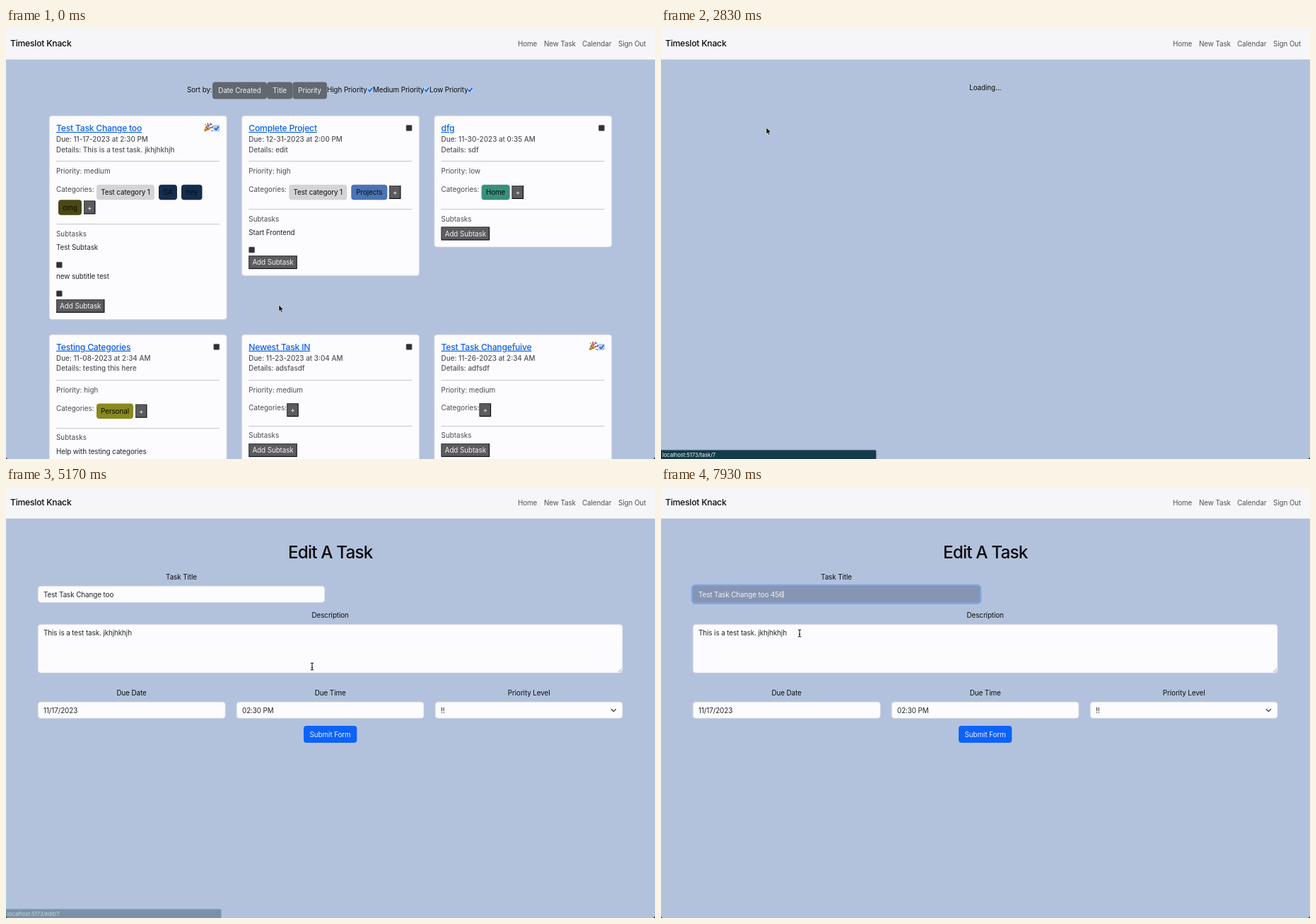
Recreate the animation shown at these times as an HTML page. Size 918 px wide and 610 px high, loop 8 s.

```html
<!DOCTYPE html>
<html lang="en">
<head>
<meta charset="utf-8">
<title>Task planner</title>
<style>
  html, body { margin: 0; width: 100%; height: 100%; overflow: hidden; background: #b3c2dc; }
  svg { display: block; width: 918px; height: 610px; }
  text { font: 400 9.9px Inter, "Open Sans", sans-serif; letter-spacing: -.01em; font-optical-sizing: none; fill: #212529; white-space: pre; }
  .mid { text-anchor: middle; }
  .nav { fill: #505357; }
  .soft { fill: #484b4f; letter-spacing: 0; }
  .sub { fill: #505357; font-weight: 500; letter-spacing: 0; }
  .black { fill: #0b0c0e; }
  .light { fill: #f1f1f4; }
  .head { font-size: 12.2px; font-weight: 500; letter-spacing: -.02em; }
  .link { fill: #0c64e4; text-decoration: underline; }
  .big { font-size: 24.3px; font-weight: 500; letter-spacing: -.035em; fill: #0b0c0e; }
  .option { font-size: 7.9px; font-weight: 500; fill: #f0f0f0; }
  .url { font-size: 7.7px; fill: #f4f7f8; }
  .card { fill: #fcfbfe; stroke: #d0d2d9; stroke-width: .6; }
  .field { fill: #fcfbfe; stroke: #d5dbe5; stroke-width: .6; }
  .check { fill: #303033; stroke: #6c6c70; stroke-width: .6; }

  #cursor { animation: travel 8s ease-in-out infinite; }
  @keyframes travel {
    0%, 4% { transform: translate(386px, 392px); }
    14.6% { transform: translate(474px, 349px); }
    20.5% { transform: translate(150px, 141px); }
    30.6%, 41.5% { transform: translate(149px, 141px); }
    49.6% { transform: translate(395px, 288px); }
    53% { transform: translate(432px, 254px); }
    64.8% { transform: translate(433px, 254px); }
    75%, 84% { transform: translate(164px, 154px); }
    87.5%, 93% { transform: translate(164px, 205px); }
    99%, 100% { transform: translate(196px, 207px); }
  }
  #taskUrl { opacity: 0; animation: taskUrl 8s linear infinite; }
  @keyframes taskUrl { 0%, 20.5% { opacity: 0; } 22%, 42% { opacity: 1; } 45%, 100% { opacity: 0; } }
  #editUrl { opacity: 0; animation: editUrl 8s linear infinite; }
  @keyframes editUrl { 0%, 53.2% { opacity: 0; } 55%, 61% { opacity: 1; } 64.6% { opacity: .36; } 67%, 100% { opacity: 0; } }
</style>
</head>
<body>
<script>
const LOOP = 8000;
const styles = [];

const text = (x, y, str, cls = '') => `<text x="${x}" y="${y}" class="${cls}">${str}</text>`;
const box = (x, y, w, h, fill, r = 0) => `<rect x="${x}" y="${y}" width="${w}" height="${h}" rx="${r}" fill="${fill}"/>`;
const path = (d, fill, stroke = 'none', width = 1) => `<path d="${d}" fill="${fill}" stroke="${stroke}" stroke-width="${width}"/>`;

// Rectangle whose border lies inside its bounds.
const panel = (x, y, w, h, cls, r = 4) =>
  `<rect x="${x + .3}" y="${y + .3}" width="${w - .6}" height="${h - .6}" rx="${r}" class="${cls}"/>`;

// A group that is visible only during the given [from, to] spans in ms.
function during(id, spans, content) {
  const stops = spans.map(([from, to]) =>
    `${from / LOOP * 100}%{visibility:visible}${to / LOOP * 100}%{visibility:hidden}`).join('');
  styles.push(`#${id}{visibility:hidden;animation:${id} ${LOOP}ms step-end infinite}@keyframes ${id}{0%{visibility:hidden}${stops}}`);
  return `<g id="${id}">${content}</g>`;
}

const button = (x, y, w, h, fill, label, cls = 'light') =>
  box(x, y, w, h, fill, 4) + text(x + w / 2, y + h / 2 + 3.6, label, 'mid ' + cls);

// Square button with an outset border.
const plainButton = (x, cy, w, label) =>
  box(x, cy - 9.5, w, 19, '#0c0c0e') + box(x, cy - 9.5, w - 1.3, 17.7, '#4a4a4d') +
  box(x + 1.3, cy - 8.2, w - 2.6, 16.4, '#5c5c5f') + text(x + w / 2, cy + 3.5, label, 'mid light');

const emptyCheck = (cx, cy) => panel(cx - 4.3, cy - 4.3, 8.6, 8.6, 'check', 1);
const tick = (cx, cy, size = 7.4) =>
  box(cx - size / 2, cy - size / 2, size, size, '#a9cdf8', 1.5) +
  path(`M${cx - 2.6} ${cy}l2 2.4 3.6-5`, 'none', '#155cc0', 1.5);

const popper = (x, y) =>
  path(`M${x} ${y + 12.5}l4-10 6 6.4z`, '#dca044') +
  path(`M${x + 1.4} ${y + 8.8}l2.4 2.4M${x + 2.8} ${y + 5.4}l4 4.4`, 'none', '#7d5a56', 1.3) +
  path(`M${x + 5} ${y + 4.6}q2-2 .6-4.8M${x + 8.4} ${y + 7.4}q2-1.8 4.8-.4`, 'none', '#b8453a', 1.4) +
  path(`M${x + 6.8} ${y + 5.8}q.6-4 5.4-4`, 'none', '#4a72b4', 1.4) +
  [[1.6, 1.2], [8.6, .2], [12, 4], [11, 10]].map(([dx, dy], i) =>
    box(x + dx, y + dy, 1.8, 1.8, ['#c99a2f', '#5a9150', '#b8453a', '#4a72b4'][i], .4)).join('');

function taskCard(x, y, task) {
  const { title, due, details, priority, done, cats = [], plus, rows = 1, subtasks = [] } = task;
  const left = x + 10;
  const rule = cy => box(left, Math.round(cy - .5), 231, 1, '#c6c6ca');
  const split = y + (cats.length ? 111.2 + 21.3 * rows : 129.4);
  const end = split + 34.5 + 40.6 * subtasks.length;
  const plusY = y + (cats.length ? 87 + 21.5 * rows : 107);
  return panel(x, y, 251.5, end + 19.3 - y, 'card') +
    text(left, y + 22, title, 'head link') +
    (done ? popper(x + 218.6, y + 10.4) + tick(x + 236.8, y + 17.8, 9) : emptyCheck(x + 236.8, y + 17.6)) +
    text(left, y + 37, 'Due: ' + due, 'sub') +
    text(left, y + 51.7, 'Details: ' + details, 'sub') +
    rule(y + 64.5) +
    text(left, y + 82, 'Priority: ' + priority, 'soft') +
    text(left, y + (cats.length ? 108 : 106.8), 'Categories:', 'soft') +
    cats.map(([label, dx, w, fill, row = 0]) =>
      button(x + dx, y + 97.8 + row * 21.5, w, 21.4, fill, label, 'black')).join('') +
    plainButton(x + plus, plusY, 16.5, '+') +
    rule(split) +
    text(left, split + 17, 'Subtasks', 'soft') +
    subtasks.map((name, i) => text(left, split + 36.3 + 40.6 * i, name) +
      emptyCheck(left + 4.3, split + 57.5 + 40.6 * i)).join('') +
    plainButton(left, end, 68.5, 'Add Subtask');
}

const general = ['Test category 1', 67, 82, '#d4d4d7'];
const columns = [61, 333.3, 605.6];
const tasks = [
  { title: 'Test Task Change too', due: '11-17-2023 at 2:30 PM', details: 'This is a test task. jkhjhkhjh', priority: 'medium', done: true,
    cats: [general, ['SA', 155, 26, '#132d4f'], ['hey', 187, 29.5, '#132d4f'], ['omg', 13, 33, '#4a4713', 1]],
    plus: 49, rows: 2, subtasks: ['Test Subtask', 'new subtitle test'] },
  { title: 'Complete Project', due: '12-31-2023 at 2:00 PM', details: 'edit', priority: 'high',
    cats: [general, ['Projects', 155, 51, '#4a74b5']], plus: 208.7, subtasks: ['Start Frontend'] },
  { title: 'dfg', due: '11-30-2023 at 0:35 AM', details: 'sdf', priority: 'low',
    cats: [['Home', 67, 40, '#38917b']], plus: 110 },
  { title: 'Testing Categories', due: '11-08-2023 at 2:34 AM', details: 'testing this here', priority: 'high',
    cats: [['Personal', 67, 52, '#89891f']], plus: 122, subtasks: ['Help with testing categories'] },
  { title: 'Newest Task IN', due: '11-23-2023 at 3:04 AM', details: 'adsfasdf', priority: 'medium', plus: 64 },
  { title: 'Test Task Changefuive', due: '11-26-2023 at 2:34 AM', details: 'adfsdf', priority: 'medium', done: true, plus: 64 }
];

const listPage = text(256, 91, 'Sort by:', 'black') +
  [['Date Created', 292, 77], ['Title', 369, 36.3], ['Priority', 405.3, 48.7]].map(([label, x, w]) =>
    button(x, 76.4, w, 24.2, '#616870', label)).join('') +
  [['High Priority', 454, 515], ['Medium Priority', 519, 595], ['Low Priority', 599, 656.5]].map(([label, x, cx]) =>
    text(x, 91, label, 'black') + tick(cx, 87.3)).join('') +
  tasks.map((task, i) => taskCard(columns[i % 3], i < 3 ? 124 : 433.7, task)).join('');

const CENTER = 458.7;
const BLUE = '#0d62fa';

const detailPage = panel(53, 87, 811.8, 191, 'card') +
  text(CENTER, 109.3, 'Test Task Change too', 'mid head') +
  ['This is a test task. jkhjhkhjh', 'Date: 11-17-2023', 'Time: 2:30 PM', 'Priority: medium', 'Status: Completed']
    .map((line, i) => text(CENTER, 129 + i * 25.3, line, 'mid')).join('') +
  button(418.5, 244, 34.2, 24, BLUE, 'Edit') +
  button(452.7, 244, 46.2, 24, '#d12d40', 'Delete');

const field = (x, y, w, h, value) => panel(x, y, w, h, 'field') + text(x + 8, y + 15.6, value);

const FOCUS = 6050, PREVIEW = 6920, CHOSEN = 7400;
const formPage = text(CENTER, 101, 'Edit A Task', 'mid big') +
  [['Task Title', 248, 131], ['Description', CENTER, 185], ['Due Date', 177.6, 295], ['Due Time', CENTER, 295], ['Priority Level', 739.7, 295]]
    .map(([label, x, y]) => text(x, y, label, 'mid black')).join('') +
  panel(45, 140, 406, 23.6, 'field') +
  field(45, 194.3, 827.3, 69, 'This is a test task. jkhjhkhjh') +
  path('M866 262l5-5M869 262l2-2', 'none', '#77797d', .7) +
  field(45, 304, 265.5, 23.6, '11/17/2023') +
  field(326, 304, 265.2, 23.6, '02:30 PM') +
  field(607, 304, 265.3, 23.6, '!!') +
  path('M855.8 314.3l3.5 3.4 3.5-3.4', 'none', '#343a40', 1.3) +
  button(421, 338, 75.3, 24, BLUE, 'Submit Form');

const popup = box(107, 169.3, 120.5, 50.6, '#1b1b1c', 2.5) + path('M113.5 169.6l5.8-5.4 5.8 5.4z', '#1b1b1c') +
  during('optionHover', [[PREVIEW, CHOSEN]], box(107, 195, 120.5, 22.5, '#3c3c3e')) +
  text(114, 186.4, 'Test Task Change too', 'option') +
  text(114, 209, 'Test Task Change too 456', 'option');

const titleField =
  during('focus', [[FOCUS, LOOP]], `<rect x="44" y="139" width="408" height="25.6" rx="4.5" fill="none" stroke="#7fa5e8" stroke-width="2.6"/>`) +
  during('typed', [[4700, PREVIEW]], text(53, 155.6, 'Test Task Change too')) +
  during('caret', [[FOCUS, PREVIEW]], box(151.4, 147, .9, 10, '#111')) +
  during('filled', [[PREVIEW, LOOP]], box(45, 140, 406, 23.6, '#8595b3', 3) + text(53, 155.6, 'Test Task Change too 456', 'light')) +
  during('endCaret', [[CHOSEN, LOOP]], box(172.6, 147, .9, 10, '#f5f5f8')) +
  during('popup', [[FOCUS + 80, CHOSEN]], popup);

const urlBar = (id, url) => `<g id="${id}">` + box(0, 596.6, 305.2, 14, '#65758f55', 2) +
  box(-3, 597.6, 307.2, 13, '#133b48', 2) + text(2, 606.8, url, 'url') + '</g>';

const arrow = path('M0 0v9.2l2.1-1.9 1.4 3.2 1.6-.7-1.4-3.1h2.9z', '#0a0a0a', '#f4f4f6', .6);
const hand = path('M-1 0q1-1 1.8 0v3.6l4 1q1.2.4 1 1.7l-.7 4.2h-5.2l-3-4q.4-1.4 2.1 0z', '#fff', '#111', .7);
const beam = path('M-2.2-5q1.6 0 2.2 1 .6-1 2.2-1M0-4v8M-2.2 5q1.6 0 2.2-1 .6 1 2.2 1M-1 1.4h2', 'none', '#1b1b1d', 1.1);

const scene = box(0, 0, 918, 610, '#b3c2dc') +
  during('listPage', [[0, 2450]], listPage) +
  during('loading', [[2450, 3400]], text(CENTER, 87.8, 'Loading...', 'mid black')) +
  during('detailPage', [[3400, 4700]], detailPage) +
  during('formPage', [[4700, LOOP]], formPage) + titleField +
  box(0, 0, 918, 44.6, '#f6f5f8') +
  text(6, 26.4, 'Timeslot Knack', 'head black') +
  [['Home', 724], ['New Task', 761], ['Calendar', 815], ['Sign Out', 866]].map(([label, x]) => text(x, 25.8, label, 'nav')).join('') +
  urlBar('taskUrl', 'localhost:5173/task/7') + urlBar('editUrl', 'localhost:5173/edit/7') +
  path('M0 607.5q.3 2.2 2.5 2.5h-2.5zM918 607q-.4 2.6-3 3h3z', '#15171c') +
  '<g id="cursor">' +
  during('arrow', [[0, 1640], [2450, 4240], [6800, 7520]], arrow) +
  during('hand', [[1640, 2450], [4240, 4700]], hand) +
  during('beam', [[4700, 6800], [7520, LOOP]], beam) + '</g>';

document.body.innerHTML = `<style>${styles.join('')}</style><svg viewBox="0 0 918 610">${scene}</svg>`;
</script>
</body>
</html>
```
